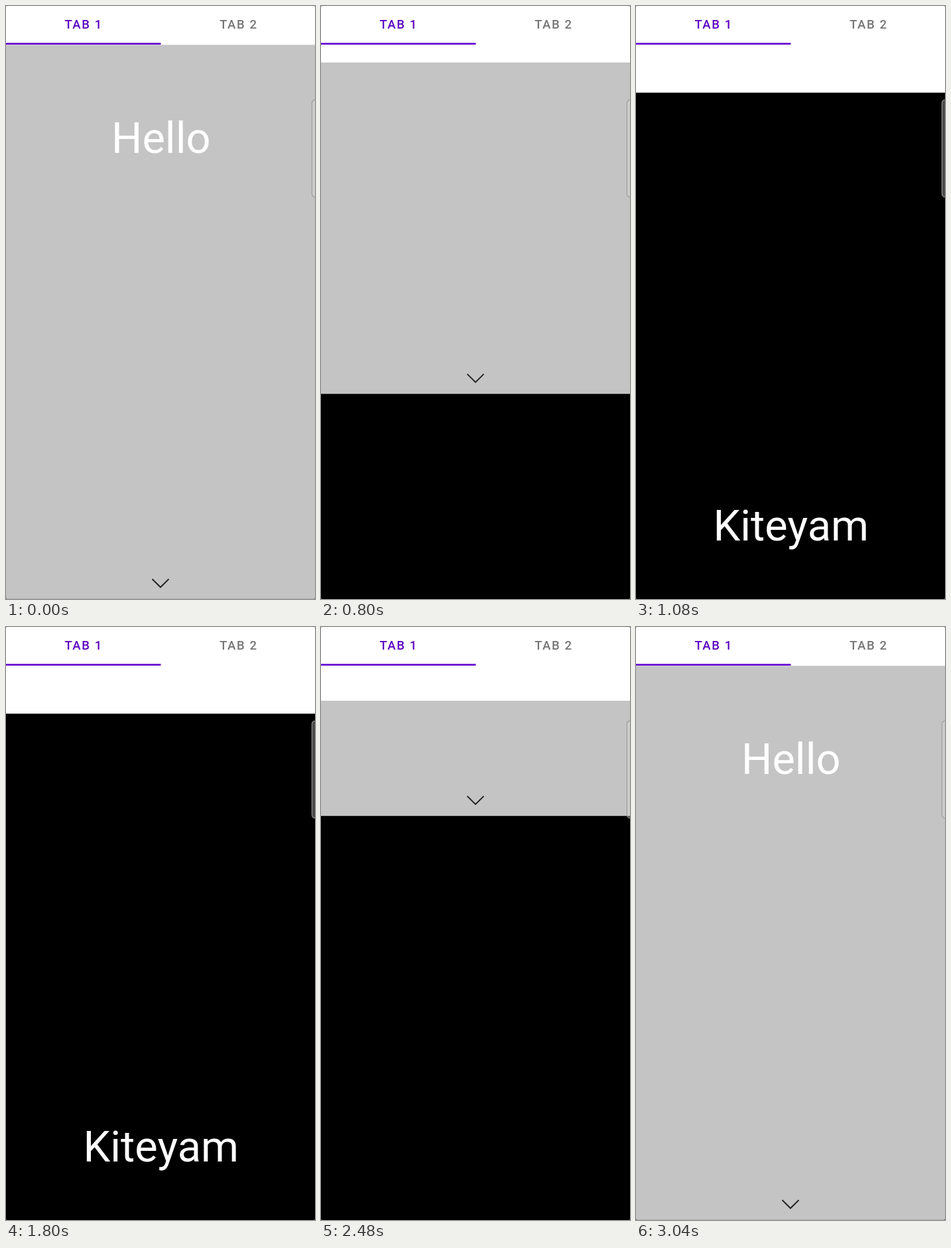
Animation, 466 px wide and 892 px high, one loop 3360 ms. Source, as an HTML page:

```html
<!DOCTYPE html>
<html lang="en">
<head>
<meta charset="utf-8">
<title>Vertical pager</title>
<style>
  html, body { margin: 0; width: 100%; height: 100%; overflow: hidden; background: #777; }
  svg { display: block; width: 466px; height: 892px; border-radius: 2px; }
  text { font-family: Roboto, sans-serif; white-space: pre; }
  .tab { font-size: 18.5px; font-weight: 500; letter-spacing: .0892em; }
  .title { font-size: 65px; fill: #fff; text-anchor: middle; }
</style>
</head>
<body>
<svg viewBox="0 0 466 892">
  <rect width="466" height="892"/>
  <g id="second">
    <text class="title" x="233.8" y="804">Kiteyam</text>
  </g>
  <g id="first">
    <rect width="466" height="891.9" fill="#c4c4c4"/>
    <text class="title" x="233.8" y="221">Hello</text>
    <path d="M220.5 862L233 874.3L245.5 862" fill="none" stroke="#222" stroke-width="1.9"/>
  </g>
  <rect id="header" width="466" fill="#fff"/>
  <text class="tab" x="88.4" y="34.2" fill="#5b00c0">TAB 1</text>
  <text class="tab" x="322.2" y="34.2" fill="#757575">TAB 2</text>
  <rect y="55.5" width="233.5" height="2.6" fill="#6000d0"/>
  <rect x="461.4" y="141" width="20" height="146.5" rx="5"
    fill="rgba(220,220,220,.34)" stroke="rgba(155,155,155,.9)" stroke-width="1.2"/>
</svg>
<script>
const LOOP = 3360, STEP = 40, TRAVEL = 833.6, TOP = 58.4, GAP = 72;
const [first, second, header] = ['first', 'second', 'header'].map(id => document.getElementById(id));

// Progress of each swipe, sampled once per display step
const forward = [.03, .11, .23, .37, .53, .67, .79, .88, .94, .98, 1];
const back = [.01, .05, .11, .18, .271, .41, .56, .69, .8, .92, 1];

function swipe(t, start, samples) {
  const i = Math.floor((t - start) / STEP);
  return i < 0 ? 0 : samples[Math.min(i, samples.length - 1)];
}

const shift = (el, y) => el.setAttribute('transform', `translate(0 ${y})`);

function draw(now) {
  const t = now % LOOP;
  const p = swipe(t, 680, forward) - swipe(t, 2320, back);
  shift(first, -TRAVEL * p);
  shift(second, TRAVEL * (1 - p));
  header.setAttribute('height', TOP + GAP * p);
}

const begin = performance.now();
function tick() {
  draw(performance.now() - begin);
  requestAnimationFrame(tick);
}
tick();
</script>
</body>
</html>
```
